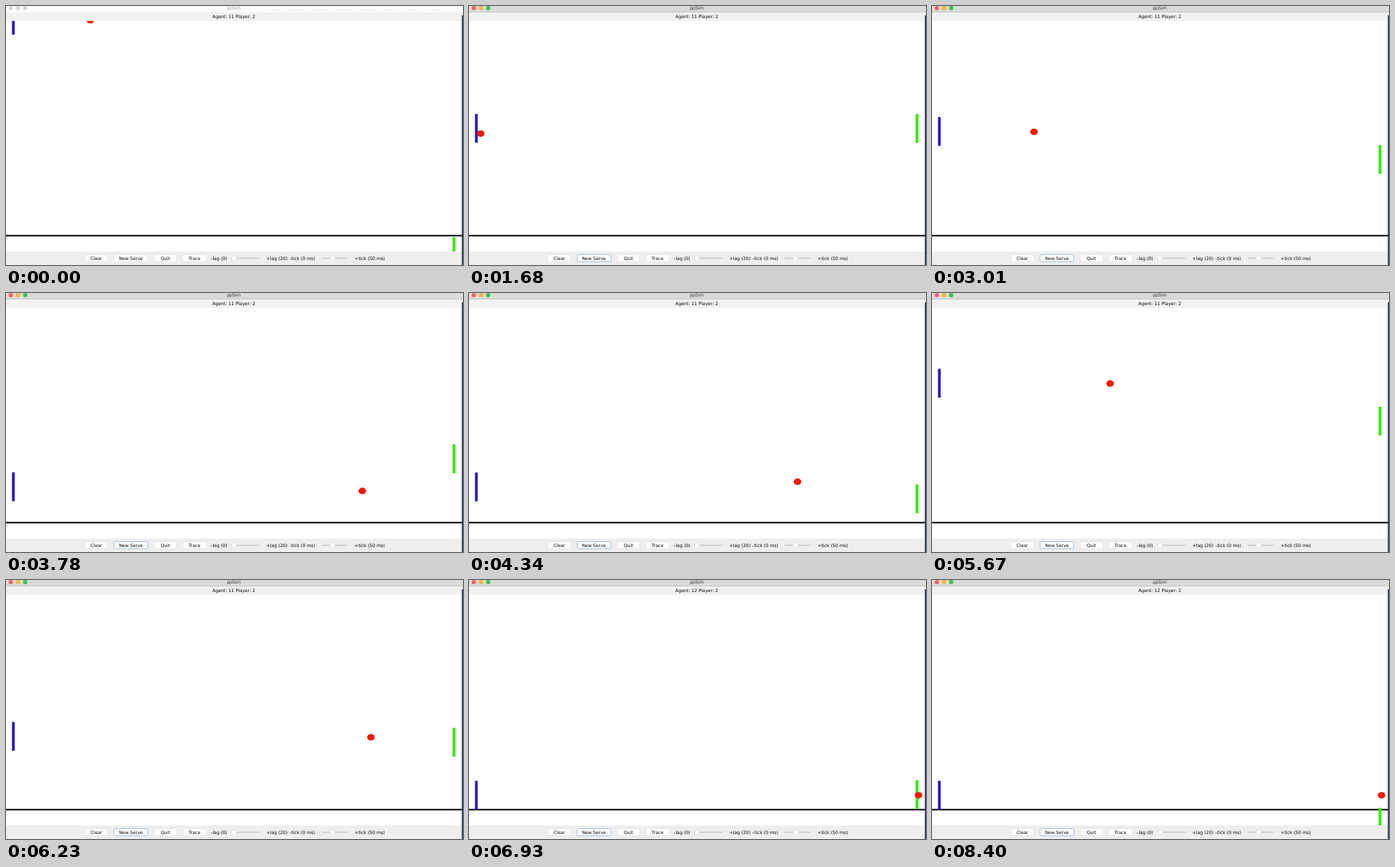
Write an HTML page that moves like this. It is 640 px wide and 364 px high and loops after 8890 ms.

```html
<!DOCTYPE html>
<html lang="en">
<head>
<meta charset="utf-8">
<title>ppSim</title>
<style>
  html, body { margin: 0; width: 100%; height: 100%; overflow: hidden; background: #fff; }
  svg { display: block; width: 640px; height: 364px; }
  text { font: 6.25px "DejaVu Sans", sans-serif; fill: #000; text-anchor: middle; }
  .btn { fill: #fff; stroke: #d8d8d8; stroke-width: .6; }
  .btn.focus { stroke: #8fb2dc; stroke-width: .8; }
  .track { fill: #c3c3c3; }
  .knob { fill: #fff; stroke: #cdcdcd; stroke-width: .6; }
</style>
</head>
<body>
<svg viewBox="0 0 640 364" xmlns="http://www.w3.org/2000/svg">
  <rect width="640" height="364" fill="#fff"/>
  <rect y="321.7" width="639" height="2" fill="#000"/>
  <rect id="agent" x="8.4" width="3.8" height="40.5" fill="#2814c4"/>
  <rect id="player" x="625.4" width="4.1" height="40.5" fill="#3ee616"/>
  <ellipse id="ball" rx="5.3" ry="4.6" fill="#ec1c06"/>

  <rect id="bar" width="640" height="9"/>
  <path id="edge" d="M0 8.5H640" stroke="#c6c6c6"/>
  <path id="ghost" d="M370 5.5H610" stroke="#e9e9e9" stroke-dasharray="14 18"/>
  <g id="lights"></g>
  <text id="name" x="319" y="5.4">ppSim</text>
  <rect y="9" width="640" height="12" fill="#f1f1f1"/>
  <text id="score" x="319" y="17.4"></text>
  <rect y="345" width="640" height="19" fill="#eee"/>
  <rect x="638.4" y="13" width="1.6" height="351" fill="#26365f"/>
  <g id="panel"></g>
</svg>
<script>
const LOOP = 8890, STEP = 70;
const FOCUS = 560, SERVE = 1610, START = 2765, MISS = 6515;
const G = 0.00014; // half of gravity, px per ms squared

const $ = id => document.getElementById(id);

function add(parent, tag, attrs, text) {
  const el = document.createElementNS("http://www.w3.org/2000/svg", tag);
  for (const k in attrs) el.setAttribute(k, attrs[k]);
  if (text) el.textContent = text;
  parent.append(el);
  return el;
}

const lights = ["#f9605a", "#f5b53c", "#3cc04a"].map((on, i) => ({
  on, el: add($("lights"), "circle", { cx: 6.7 + 10.1 * i, cy: 3, r: 3 })
}));

function button(x, w, label) {
  const el = add($("panel"), "rect", { class: "btn", x, y: 349.4, width: w, height: 10, rx: 2 });
  add($("panel"), "text", { x: x + w / 2, y: 356.6 }, label);
  return el;
}
function slider(x, w, knob) {
  add($("panel"), "rect", { class: "track", x, y: 353.8, width: w, height: 1.5, rx: .7 });
  add($("panel"), "circle", { class: "knob", cx: knob, cy: 354.6, r: 3.6 });
}
button(110.5, 32, "Clear");
const serveBtn = button(151.2, 47.5, "New Serve");
button(207.5, 31.5, "Quit");
button(247.5, 33, "Trace");
slider(315, 40, 319.5);
slider(442, 36, 457.5);
[[298, "–lag (0)"], [379.3, "+lag (20)"], [414.8, "–tick (0 ms)"], [509.5, "+tick (50 ms)"]]
  .forEach(([x, s]) => add($("panel"), "text", { x, y: 356.6 }, s));

// Flight between two heights under gravity
const fall = (t, [t0, y0], [t1, y1]) =>
  y0 + (y1 - y0) * (t - t0) / (t1 - t0) + G * (t - t0) * (t - t1);

// Parabola through three points, used for the slowing horizontal speed
const arc = (t, [a, p], [b, q], [c, r]) =>
  p * (t - b) * (t - c) / ((a - b) * (a - c)) +
  q * (t - a) * (t - c) / ((b - a) * (b - c)) +
  r * (t - a) * (t - b) / ((c - a) * (c - b));

function path(t, pts) {
  let i = 1;
  while (i < pts.length - 1 && t > pts[i][0]) i++;
  const [t0, a] = pts[i - 1], [t1, b] = pts[i];
  const k = Math.min(1, Math.max(0, (t - t0) / (t1 - t0)));
  return a + (b - a) * k;
}

const HIT_R = 4070, HIT_L = 5230;
const bounces = [[START, 179.3], [3929, 317], [HIT_R, 285], [4176, 317], [HIT_L, 115], [MISS, 302.5]];

function ballY(t) {
  if (t < SERVE) return 20;
  t = Math.min(MISS, Math.max(START, t));
  let i = 1;
  while (t > bounces[i][0]) i++;
  return fall(t, bounces[i - 1], bounces[i]);
}

function ballX(t) {
  if (t < SERVE) return 118;
  t = Math.min(MISS, Math.max(START, t));
  if (t < HIT_R) return arc(t, [START, 16.4], [3780, 499], [HIT_R, 617]);
  if (t < HIT_L) return arc(t, [HIT_R, 617], [4830, 202], [HIT_L, 17]);
  return arc(t, [HIT_L, 17], [5670, 249.5], [MISS, 629.5]);
}

function agentY(t) {
  if (t < SERVE) return 20;
  if (t < START) return 172;
  return ballY(t - (t < HIT_L ? 25 : 5)); // the agent trails the ball slightly
}

const hand = [
  [1680, 172], [1890, 159], [2100, 159], [2240, 157], [2730, 157], [3150, 245], [3430, 321],
  [3640, 314], [3780, 233], [4070, 283], [4150, 314], [4550, 262], [4830, 209], [5460, 199],
  [5670, 180], [6370, 240], [6930, 301.5], [7210, 301.5], [7350, 306], [7490, 303],
  [7560, 303], [7770, 332], [7910, 332], [8120, 341.5], [8330, 341.5], [8400, 340.5]
];
const playerY = t => t < SERVE ? 345 : path(t, hand);

function draw(ms) {
  const t = Math.floor(ms % LOOP / STEP) * STEP;
  const active = t >= FOCUS;
  $("bar").setAttribute("fill", active ? "#dadada" : "#fbfbfb");
  $("edge").style.display = active ? "" : "none";
  $("ghost").style.display = active ? "none" : "";
  $("name").style.fill = active ? "#333" : "#aaa";
  lights.forEach(l => l.el.setAttribute("fill", active ? l.on : "#d8d8d8"));
  serveBtn.classList.toggle("focus", active);
  $("score").textContent = `Agent: ${t > MISS ? 12 : 11} Player: 2`;
  $("agent").setAttribute("y", agentY(t) - 20.2);
  $("player").setAttribute("y", playerY(t) - 20.2);
  $("ball").setAttribute("cx", ballX(t));
  $("ball").setAttribute("cy", ballY(t));
}

const begin = performance.now();
function tick() {
  draw(performance.now() - begin);
  requestAnimationFrame(tick);
}
tick();
</script>
</body>
</html>
```
